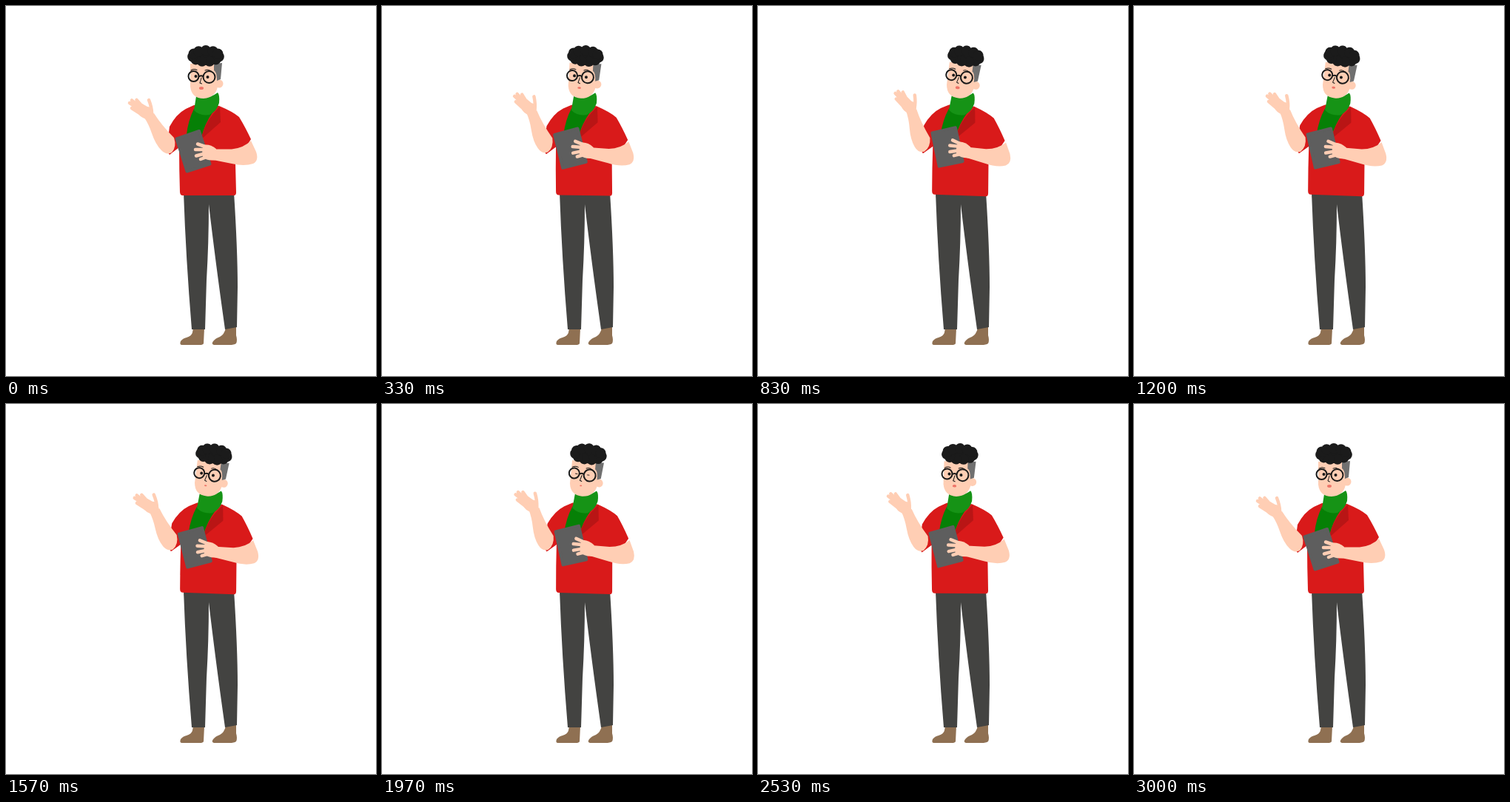
Recreate the animation shown at these times as an HTML page. Size 500 by 500 pixels, loop 3030 ms.

```html
<!DOCTYPE html>
<html lang="en">
<head>
<meta charset="utf-8">
<title>Talking man</title>
<style>
html, body { margin: 0; width: 100%; height: 100%; overflow: hidden; background: #fff; }
svg { display: block; width: 100vw; height: 100vh; }
.skin { fill: #ffceb4; }
.fingers { fill: none; stroke: #ffceb4; stroke-width: 4.5; stroke-linecap: round; }
.line { fill: none; stroke: #1a1a1a; stroke-linecap: round; }
</style>
</head>
<body>
<svg viewBox="0 0 500 500">
  <g fill="#8f7052">
    <path d="M253 435H268L267 456Q266 458 262 458H238Q234 458 236 453Q239 449 244 448Q251 446 252 441Z"/>
    <path d="M297 435L311 433V445Q313 452 311 456Q308 458 302 458H281Q277 457 280 453Q283 449 289 447Q295 444 297 435Z"/>
  </g>
  <path fill="#434341" d="M240 252H308Q313 330 313 380L312 434L296 437Q283 345 274 268Q274 320 271 370L269 437H251Q243 340 240 252Z"/>

  <g id="torso">
    <path fill="#d91a1a" d="M254 134L243 139Q230 146 221 163L217 195L221 201L234 191Q234 220 235 251Q235 256 239 256H308Q311 256 311 252L310 212L324 191L331 180Q323 163 315 150Q307 143 288 135Z"/>
    <path fill="#068006" d="M254 139Q246 155 244 174L264 178Q268 160 279 144Z"/>
    <path fill="#169316" d="M257 122Q273 127 286 117Q289 120 288 131Q285 142 275 147Q262 149 254 141Z"/>
    <path fill="#b91515" d="M289 136L290 157L264 180Q268 156 289 136Z"/>

    <g id="head">
      <circle class="skin" cx="288" cy="105" r="5.5"/>
      <path class="skin" d="M249 78V109Q251 125 267 125Q283 124 286 109L291 78Z"/>
      <path fill="#707070" d="M281 78L292 77L290 99L285 101Q285 89 281 87Z"/>
      <g id="hair" fill="#1b1b1b"><ellipse cx="270" cy="68" rx="22" ry="12"/></g>
      <g id="eyes" fill="#1a1a1a"><circle cx="256.500" cy="95" r="2"/><circle cx="272.500" cy="96" r="2"/></g>
      <path class="line" d="M250 87Q254 84.500 258 86.500M269 87Q273 85 277 88M264 97Q263 101 262 104L264.500 105"/>
      <g class="line" stroke-width="2">
        <circle cx="253.500" cy="95" r="7"/><circle cx="274.500" cy="96" r="8"/>
        <path d="M261 95Q264 93.500 266 95"/>
      </g>
      <ellipse id="mouth" cx="264" cy="111" rx="3" ry="2" fill="#ee7468"/>
    </g>

    <g id="wave">
      <path class="skin" d="M187 151L200 145Q210 161 227 178Q231 190 224 198Q217 202 210 195Q202 187 197 172Q193 160 187 151Z"/>
      <g id="hand">
        <path class="skin" d="M187 152Q179 149 177 141L184 132L191 136L197 137Q199 142 200 148Q196 155 187 152Z"/>
        <path class="fingers" d="M183 141L167 131M184 139L170 127.500M188 140L176.500 127M184 147L170 138M197 145Q197 137 193 127"/>
      </g>
    </g>

    <g id="hold">
      <path fill="#5e5e5e" stroke="#5e5e5e" stroke-width="4" stroke-linejoin="round" d="M230.500 179.500L261 169L275.500 213.500L244.500 223.500Z"/>
      <path class="skin" d="M281 193.500L305 193.500Q321 192 331 182L338 197Q342 209 334 213Q322 217 305 213L280 208Z"/>
      <path class="skin" d="M284 193Q275 186 267 188Q264 196 266 204Q272 210 284 208Z"/>
      <path class="fingers" d="M272 191L259 186.500M269 194L256 194M270 199L257 202.500M274 203L263 207"/>
    </g>
  </g>
</svg>
<script>
const LOOP = 3030, CURLS = 11;
const part = id => document.getElementById(id);

// Smooth step from 0 to 1 while t runs from a to b.
function ease(t, a, b) {
  const x = Math.min(1, Math.max(0, (t - a) / (b - a)));
  return x * x * (3 - 2 * x);
}

function turn(id, angle, x, y) {
  part(id).setAttribute("transform", `rotate(${angle} ${x} ${y})`);
}

function squash(id, sx, sy, x, y) {
  part(id).setAttribute("transform", `translate(${x} ${y}) scale(${sx} ${sy}) translate(${-x} ${-y})`);
}

for (let i = 0; i < CURLS; i++) {
  const a = (i + .25) / CURLS * 2 * Math.PI;
  const curl = document.createElementNS("http://www.w3.org/2000/svg", "circle");
  curl.setAttribute("cx", 270 + 18 * Math.cos(a));
  curl.setAttribute("cy", 67.5 + 7.5 * Math.sin(a));
  curl.setAttribute("r", 7);
  part("hair").append(curl);
}

function draw(now) {
  const t = now % LOOP;
  const lean = ease(t, 0, 700) - ease(t, 1600, 3000);
  const dip = ease(t, 850, 1580) - ease(t, 1580, 2100);
  const lift = ease(t, 0, 500) - .65 * dip - ease(t, 2230, 3000);
  const droop = ease(t, 900, 1600) - ease(t, 1970, 3000);
  const blink = ease(t, 1870, 1960) - ease(t, 2000, 2090);
  const open = .5 + .5 * Math.cos(7 * 2 * Math.PI * t / LOOP);

  turn("torso", 2 * lean, 272, 255);
  turn("head", 5 * lean, 270, 118);
  turn("wave", 12 * lift, 221, 192);
  turn("hand", -7 * droop, 194, 149);
  turn("hold", 4 * lift, 328, 205);
  squash("eyes", 1, 1 - .75 * blink, 264, 95.5);
  squash("mouth", .5 + .5 * open, .4 + .6 * open, 264, 111);
  requestAnimationFrame(draw);
}
requestAnimationFrame(draw);
</script>
</body>
</html>
```
